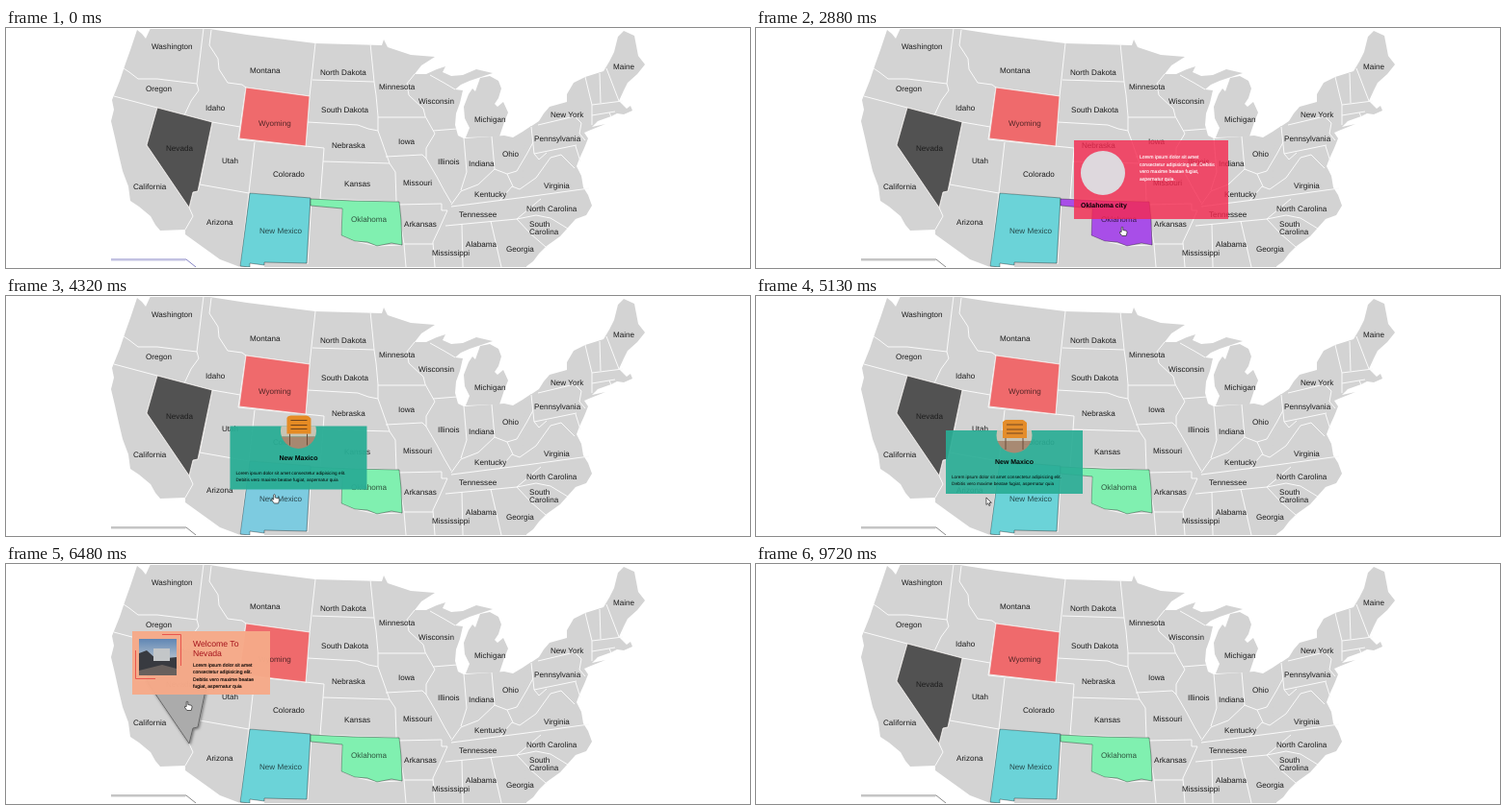
An HTML page for the animation above (9.75 s loop, 772 by 250 pixels).

```html
<!DOCTYPE html>
<html lang="en">
<head>
<meta charset="utf-8">
<title>State map</title>
<style>
html, body { margin: 0; width: 100%; height: 100%; overflow: hidden; background: #fff; }
svg { display: block; width: 772px; height: 250px; font-family: "Liberation Sans", Arial, sans-serif; text-rendering: geometricPrecision; }
.borders { fill: none; stroke: #fafafa; stroke-width: 1; stroke-linejoin: round; }
.labels { font-size: 8.1px; fill: #1c1c1c; }
.small { font-size: 5.1px; }
.title { font-size: 7px; font-weight: bold; }
</style>
</head>
<body>
<svg viewBox="0 0 772 250">
  <defs>
    <clipPath id="stage"><rect y="1" width="772" height="248"/></clipPath>
    <clipPath id="round"><circle cx="71" cy="5" r="18.5"/></clipPath>
    <filter id="shadow" x="-20%" y="-20%" width="140%" height="140%">
      <feDropShadow dx="1" dy="1" stdDeviation="1.5" flood-opacity=".5"/>
    </filter>
    <linearGradient id="sky" x2="0" y2="1">
      <stop stop-color="#5f86b4"/><stop offset=".6" stop-color="#b9c4cf"/>
    </linearGradient>
  </defs>

  <g clip-path="url(#stage)">
    <g fill="#d3d3d3">
      <path d="M136 2L141 6 145 11 150 0H205L250 7 321 16 390 18 392 12 396 20 405 23 420 28 445 30 431 39 424 48 436 48 447 43 456 40 453 46 462 50 474 49 488 43 505 47 493 51 481 55 472 59 466 64 474 65 471 78 467 89 466 101 469 112 475 115 504 113 517 112 526 114 536 108 545 102 L545 131 540 150 540 249H268V246L253 245V249H243L222 241 186 215V210L160 211 155 205 150 196 138 186 129 180 127 165 121 149 117 132 113 114 109 97 112 85 110 75 118 55 124 37 129 23Z"/>
      <path d="M539 249L547 243 553 235 561 227 575 217 583 208 591 199 602 195 608 185 604 174 599 166 597 154 592 144 595 136 600 125 604 115 600 109 607 106 622 100 608 103 614 97 628 92 634 89 641 90 650 86 648 81 644 84 639 79 636 76 641 65 645 57 655 48 663 38 656 29 652 8 641 3 635 9 631 25 626 35 620 45 601 51 589 57 582 69 582 77 564 82 558 89 553 97 544 103 536 130Z"/>
      <path d="M477 114L481 104 476 94 475 82 480 69 484 63 487 66 492 52 502 50 511 55 514 63 511 73 507 79 510 82 516 77 521 88 517 98 512 113Z"/>
    </g>
    <g class="borders">
      <path d="M122 42L128 46 137 53 157 53 198 58M205 0L198 58 200 65 192 76 185 91M112 71L157 83 214 98 243 103M213 2L211 18 220 32 221 43 230 57 245 59 249 62 241 116 330 125M214 98L201 163 252 172 316 178M258 119L252 172M157 83L146 122 190 187 194 196 186 210M201 163L199 170 194 171 190 187M252 172L243 249M249 62L315 71 311 124M321 16L315 71"/>
      <path d="M318 54L382 56M313 98L365 101 376 105 386 107M330 125L329 139 398 141M329 139L326 178 405 181M378 16L382 56 384 70 386 92V107L398 141 404 150 405 181M386 93H435M424 48L416 58 418 70 433 84 435 92 445 110 436 125V136L447 155 455 170 462 182M394 134L432 132 436 136M443 107L468 105M440 49L456 58 466 64M475 114L478 150 472 169M504 113L507 147"/>
      <path d="M462 184L472 170 490 163 507 147 520 152 530 149 540 132 547 119M545 103L548 131 592 122M552 101L590 92 597 99 595 110 601 117M462 186L540 176 605 167M456 206L530 199 555 178M405 184L452 183V190H458L450 208 443 223 445 249M406 184L413 225H443M413 225L415 249M473 204L474 249M503 201L514 249M530 199L545 215 560 228"/>
      <path d="M530 199L550 195 565 198 583 209M525 165L513 179M525 165L533 168 550 156 565 135 576 132 590 146M520 152L526 165M548 131L553 137 561 130M601 51L608 80V101M616 47L617 78M623 42L636 76M608 80L640 76M608 91L632 87M626 88L628 93M349 188L348 216 362 222 385 227 410 226M591 123L596 139M313 246L317 178"/>
    </g>
    <g id="inset" fill="none"><path d="M109 241H187L197 249"/><path d="M109 242.5H186" opacity=".25"/></g>
    <g id="states" stroke-width=".8"></g>
    <g id="labels" class="labels"></g>
  </g>

  <g id="ok">
    <rect id="okBack" width="160" height="82" fill-opacity=".8"/>
    <circle cx="30" cy="34" r="23" fill="#ded8dd"/>
    <text class="title" x="7" y="70">Oklahoma city</text>
    <g class="small" fill="#fff" stroke="#fff" stroke-width=".12" data-x="68" data-y="19" data-step="7.6"
       data-lines="Lorem ipsum dolor sit amet|consectetur adipisicing elit. Debitis|vero maxime beatae fugiat,|aspernatur quia."></g>
  </g>

  <g id="nm">
    <rect width="142" height="66" fill="#2aad95" fill-opacity=".95"/>
    <g clip-path="url(#round)">
      <path d="M50 -15H92V0H50Z" fill="#c9cfcc" opacity=".25"/>
      <path d="M50 0H92V11H50Z" fill="#c8c4b4"/>
      <path d="M50 11H92V26H50Z" fill="#a78870"/>
      <path d="M62 8V20M80 8V20" stroke="#6b4b36"/>
      <rect x="59" y="-11" width="25" height="19" fill="#e58b24"/>
      <path d="M63 -6H80M63 -1H80M63 3H80" stroke="#70431a"/>
    </g>
    <text class="title" x="71" y="35" text-anchor="middle">New Maxico</text>
    <g class="small" style="font-size:4.7px" data-x="6" data-y="50" data-step="7"
       data-lines="Lorem ipsum dolor sit amet consectetur adipisicing elit.|Debitis vero maxime beatae fugiat, aspernatur quia"></g>
  </g>

  <g id="nv">
    <rect width="143" height="66" fill="#f6aa89" fill-opacity=".97"/>
    <path d="M31 3.5H50.5V36M3.5 20V49.5H24" fill="none" stroke="#e8564d"/>
    <rect x="7" y="8" width="39" height="38" fill="url(#sky)"/>
    <path d="M7 23L15 20 25 29 46 27V46H7Z" fill="#383a40"/>
    <path d="M22 18H39V31H22Z" fill="#c3c6c8"/>
    <path d="M7 41L31 35 46 39V46H7Z" fill="#68605d"/>
    <g fill="#a5131c" style="font-size:8.7px" data-x="63" data-y="16" data-step="10" data-lines="Welcome To|Nevada"></g>
    <g class="small" stroke="#000" stroke-width=".12" data-x="63" data-y="37" data-step="7.3"
       data-lines="Lorem ipsum dolor sit amet|consectetur adipisicing elit.|Debitis vero maxime beatae|fugiat, aspernatur quia"></g>
  </g>

  <g id="cursor" fill="#fff" stroke="#222" stroke-width=".7" stroke-linejoin="round">
    <path id="arrow" d="M0 0V7.5L1.8 5.9 3 8.6 4.2 8 3 5.4H5.4Z"/>
    <path id="hand" d="M-.8 .6Q0 -.5 .8 .6V3.5L4.4 4.3Q5.2 4.8 5 6.3L4.2 9.5H-.2L-2.8 6Q-2.6 4.6 -.8 5.6Z"/>
  </g>
</svg>

<script>
const LOOP = 9750, FADE = 300;
const $ = id => document.getElementById(id);
const clamp = (v, lo, hi) => Math.min(hi, Math.max(lo, v));

function add(parent, tag, attrs, text = '') {
  const el = document.createElementNS('http://www.w3.org/2000/svg', tag);
  for (const name in attrs) el.setAttribute(name, attrs[name]);
  el.textContent = text;
  return parent.appendChild(el);
}

const labels = `Washington 151 22|Oregon 145 66|California 132 168|Idaho 207 86|Montana 253 47|Nevada 166 128|Utah 224 141
Arizona 208 205|Wyoming 262 102|Colorado 277 155|New Mexico 263 214|North Dakota 326 49|South Dakota 327 88|Nebraska 338 125
Kansas 351 165|Oklahoma 358 202|Minnesota 387 64|Iowa 407 121|Missouri 412 164|Arkansas 413 207|Wisconsin 428 79
Illinois 448 142|Indiana 480 144|Michigan 486 98|Ohio 515 134|Kentucky 486 176|Tennessee 470 197|Mississippi 442 237
Alabama 477 228|Georgia 519 233|South 543 207|Carolina 543 215|North Carolina 540 191|Virginia 558 167
Pennsylvania 548 118|New York 565 93|Maine 630 43`;
const tinted = /^(Wyoming|New Mexico|Oklahoma|Nevada)/;
for (const entry of labels.split(/[|\n]/)) {
  const [, name, x, y] = entry.match(/(.+) (\d+) (\d+)$/);
  add($('labels'), 'text', tinted.test(name) ? { x, y, fill: '#000', opacity: .65 } : { x, y }, name);
}

for (const block of document.querySelectorAll('[data-lines]')) {
  const { x, y, step, lines } = block.dataset;
  lines.split('|').forEach((line, i) => add(block, 'text', { x, y: +y + i * step }, line));
}

const shape = (d, fill, stroke) => add($('states'), 'path', { d, fill, stroke });
const PALE = '#f4f0ee', DARK = 'rgba(0,0,0,.42)';
shape('M249 62L315 71 311 123 242 115Z', '#ef6a6c', PALE);

// Each hot state: shape, hover interval, card offset from the pointer
const hot = [
  { card: $('nv'), el: shape('M157 83L214 98 199 170 194 171 190 187 146 122Z', '', PALE),
    base: '#525252', hover: '#ababab', from: 5800, to: 7400, dx: 57, dy: 73 },
  { card: $('nm'), el: shape('M253 172L316 177 312 245 268 244V247L253 245V249L243 248Z', '', DARK),
    base: '#6bd3d8', hover: '#7dcbe0', from: 3800, to: 5120, dx: 46, dy: 71 },
  { card: $('ok'), el: shape('M316 178L360 180 408 181 410 200 411 226 400 224 385 227 375 223 362 222 348 216 349 188 316 185Z', '', DARK),
    base: '#80f0b0', hover: '#a84ee8', from: 1520, to: 3580, dx: 50, dy: 90 }
];

// Pointer path: time, x, y
const path = [
  [950, 432, 252], [1520, 403, 200], [1680, 386, 210], [2000, 376, 200], [2300, 380, 197],
  [2600, 389, 204], [2880, 380, 207], [3250, 372, 202], [3580, 357, 220], [3660, 331, 235],
  [3800, 313, 231], [4200, 283, 205], [4600, 268, 210], [5120, 243, 211], [5130, 239, 210],
  [5500, 216, 188], [5800, 199, 161], [6100, 184, 134], [6480, 188, 143], [7000, 185, 140],
  [7400, 178, 170], [8010, 150, 252]
];

function pointer(t) {
  t = clamp(t, path[0][0], path.at(-1)[0]);
  const i = Math.max(1, path.findIndex(p => p[0] >= t));
  const [t0, x0, y0] = path[i - 1], [t1, x1, y1] = path[i];
  const k = (t - t0) / (t1 - t0);
  return [x0 + (x1 - x0) * k, y0 + (y1 - y0) * k];
}

function draw(now) {
  const t = now % LOOP;
  let hovering = false;
  for (const { card, el, base, hover, from, to, dx, dy } of hot) {
    const inside = t >= from && t < to;
    hovering ||= inside;
    el.setAttribute('fill', inside ? hover : base);
    const k = clamp(Math.min(t - from, to + FADE - t) / FADE, 0, 1);
    const [x, y] = pointer(clamp(t, from, to));
    card.setAttribute('transform', `translate(${x - dx} ${y - dy})`);
    card.setAttribute('opacity', k);
    card.style.display = k ? '' : 'none';
    if (card.id === 'ok') {
      const f = 1 - k;
      $('okBack').setAttribute('fill', `rgb(${245 + 15 * f},${41 + 40 * f},${79 - 140 * f})`);
    }
    if (card.id === 'nv') {
      el.setAttribute('filter', inside ? 'url(#shadow)' : 'none');
      el.setAttribute('stroke', inside ? '#555' : PALE);
    }
  }
  $('inset').setAttribute('stroke', t < 300 ? '#8583c4' : '#8a8a8a');
  const [x, y] = pointer(t);
  $('cursor').setAttribute('transform', `translate(${x} ${y})`);
  $('hand').style.display = hovering ? '' : 'none';
  $('arrow').style.display = hovering ? 'none' : '';
}

const start = performance.now();
(function frame() {
  draw(performance.now() - start);
  requestAnimationFrame(frame);
})();
</script>
</body>
</html>
```
